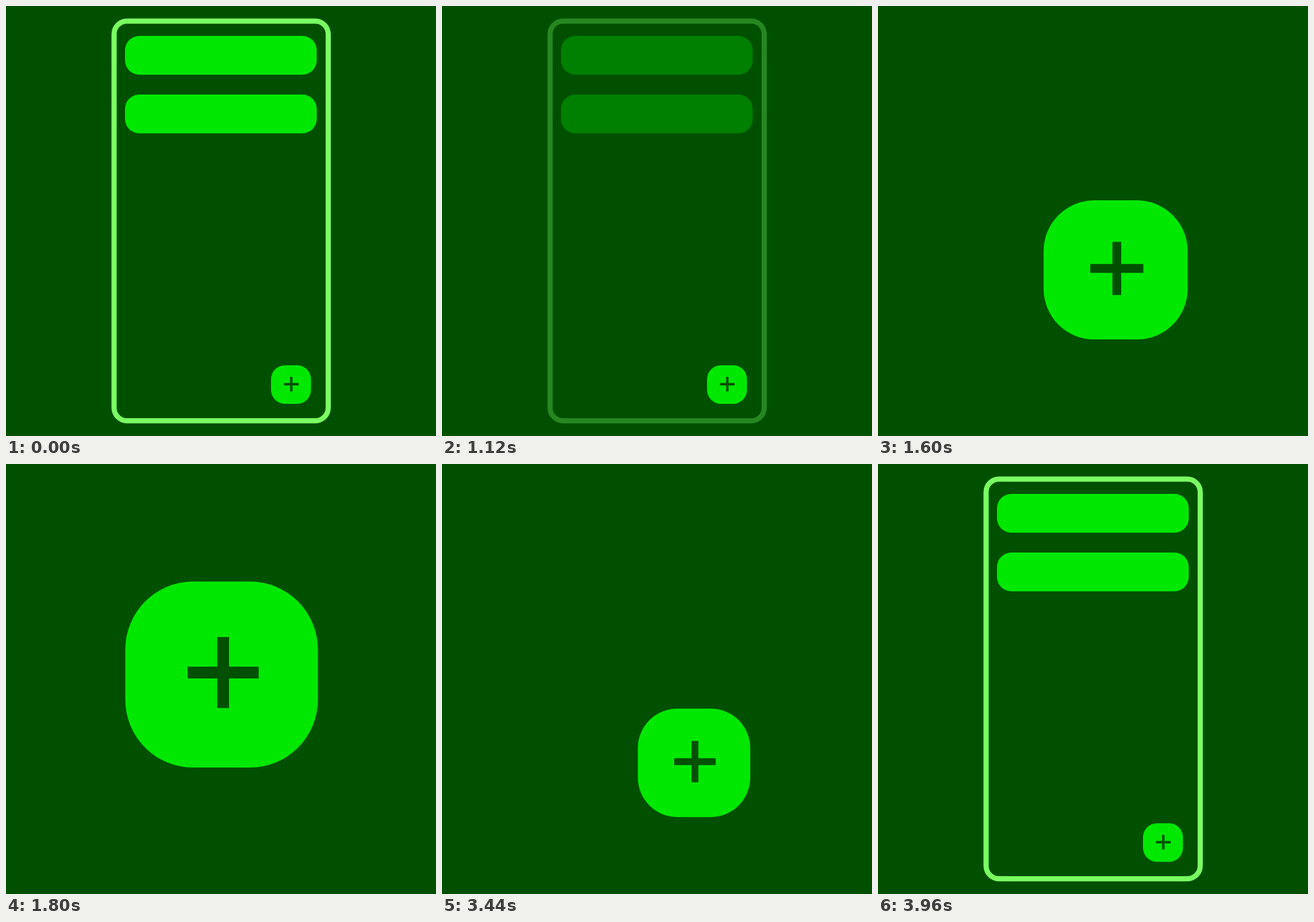
Recreate the animation shown at these times as an HTML page. Size 748 px wide and 748 px high, loop 4 s.

```html
<!DOCTYPE html>
<html lang="en">
<head>
<meta charset="utf-8">
<title>Floating button</title>
<style>
  html, body { margin: 0; height: 100%; overflow: hidden; background: #005000; }
  svg { display: block; width: 100%; height: 100%; }
</style>
</head>
<body>
<svg viewBox="0 0 748 748">
  <g id="screen" fill="#00e800">
    <rect x="188" y="26.3" width="372.5" height="695.2" rx="22.5" fill="none" stroke="#7aff62" stroke-width="9"/>
    <rect x="207" y="52" width="333.5" height="67.5" rx="25"/>
    <rect x="207" y="154" width="333.5" height="67.5" rx="25"/>
  </g>
  <g id="button">
    <rect x="-167.5" y="-161.75" width="335" height="323.5" rx="118" fill="#00e800"/>
    <path d="M-59 -3.5H64.5M2.7 -65.2V58.3" stroke="#005000" stroke-width="20.5"/>
  </g>
</svg>
<script>
  const LOOP = 4000;
  const screenGroup = document.getElementById('screen');
  const button = document.getElementById('button');

  const mix = (a, b, p) => a + (b - a) * p;

  // Eased progress from 0 to 1 between two times
  function ease(t, start, end) {
    const u = Math.min(1, Math.max(0, (t - start) / (end - start)));
    return u * u * (3 - 2 * u);
  }

  function draw(now) {
    const t = now % LOOP;
    const hidden = ease(t, 920, 1240) - ease(t, 3700, 3960);
    const grown = ease(t, 1264, 1804) - ease(t, 3105, 3755);
    const x = mix(495.75, 375, grown);
    const y = mix(658.5, 366.25, grown);
    const scale = mix(69.5 / 335, 1, grown);

    screenGroup.setAttribute('opacity', 1 - hidden);
    button.setAttribute('transform', `translate(${x} ${y}) scale(${scale})`);
  }

  const begin = performance.now();
  function tick() {
    draw(performance.now() - begin);
    requestAnimationFrame(tick);
  }
  tick();
</script>
</body>
</html>
```
